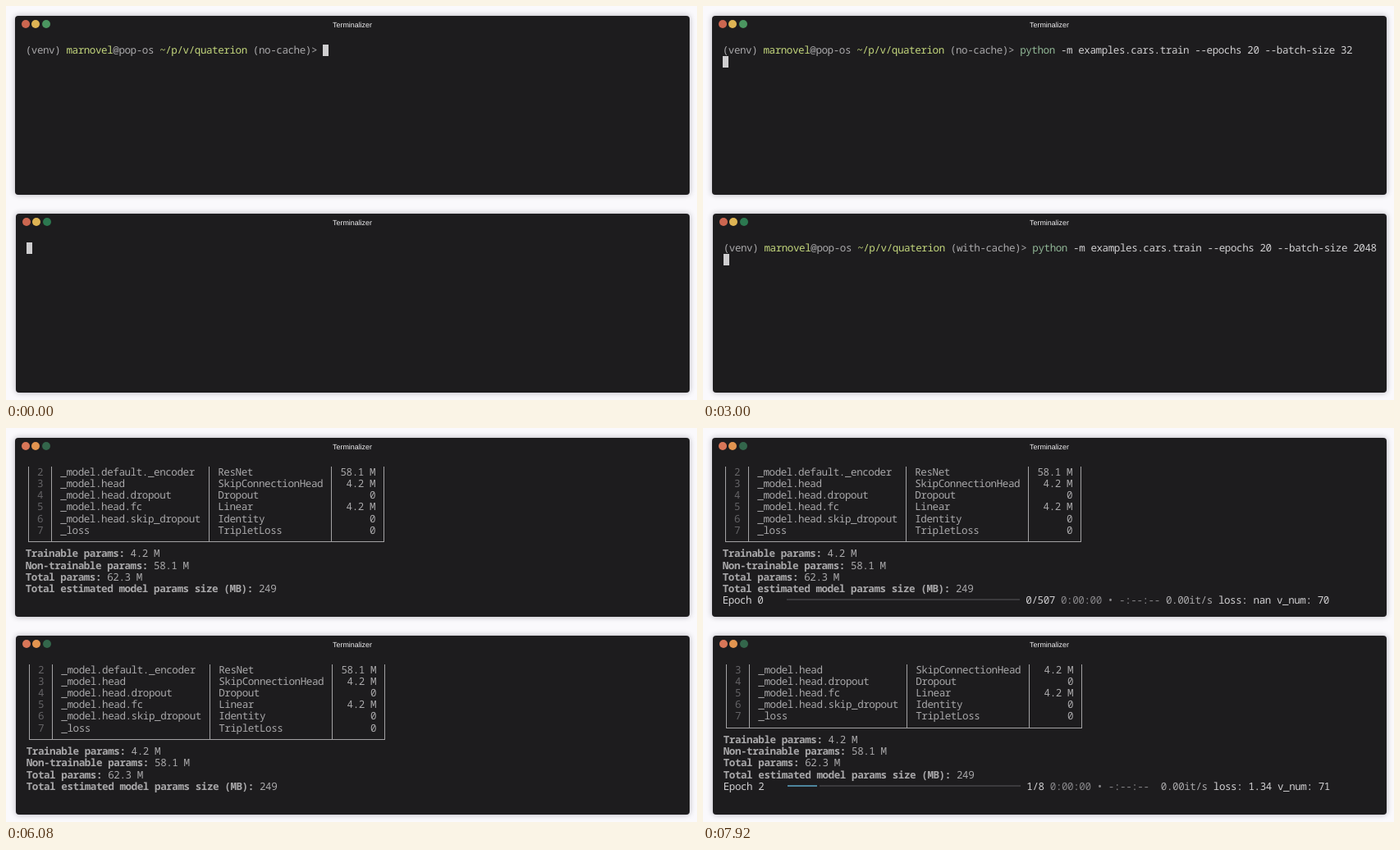
Recreate the animation shown at these times as an HTML page. Size 842 px wide and 480 px high, loop 8000 ms.

```html
<!DOCTYPE html>
<html lang="en">
<head>
<meta charset="utf-8">
<title>Training with and without cache</title>
<style>
  :root { --cw: 7.11px; --rh: 14.22px; }
  html, body { margin: 0; width: 842px; height: 480px; overflow: hidden; background: #faf9fc; }
  body { position: relative; }
  .win {
    position: absolute; height: 218px; border-radius: 4px;
    background: #1d1c1e; box-shadow: 0 0 7px rgba(20, 15, 35, .3);
  }
  #top { left: 11px; top: 12px; width: 822px; }
  #low { left: 12px; top: 252.8px; width: 821px; }
  .title {
    position: absolute; left: 0; right: 0; top: 5px; text-align: center;
    font: 8.9px/12px "Liberation Sans", Arial, sans-serif; color: #f0eff1;
    text-rendering: geometricPrecision;
  }
  #low .title { left: -1px; }
  .dot { position: absolute; top: 5.4px; width: 10px; height: 10px; border-radius: 50%; }
  .dot:nth-child(1) { left: 8px; background: #cb6650; }
  .dot:nth-child(2) { left: 20.3px; background: #deb454; }
  .dot:nth-child(3) { left: 32.6px; background: #4b9660; }
  #low .dot:nth-child(3) { background: #2c7850; }
  .late .dot:nth-child(1) { background: #d87658; }
  .late .dot:nth-child(2) { background: #e29450; }
  .late .dot:nth-child(3), #low.late .dot:nth-child(3) { background: #33664b; }
  .screen {
    position: absolute; left: 12.7px; top: 34.8px;
    font: 12.6px/var(--rh) "Noto Sans Mono", "DejaVu Sans Mono", monospace;
    letter-spacing: calc(var(--cw) - .6em);
    text-rendering: geometricPrecision; font-kerning: none; font-variant-ligatures: none;
    white-space: pre; color: #a9a8aa;
  }
  .row { height: var(--rh); }
  .user { color: #c3d67c; }
  .bad { color: #c9835a; }
  .ok { color: #91b796; }
  .lit { color: #d0cfd1; }
  .hint { color: #706f71; }
  .num { color: #646366; }
  .dim { color: #88878a; }
  .cur, .bar { display: inline-block; height: var(--rh); vertical-align: top; }
  .cur { width: var(--cw); background: #cfced0; color: #1d1c1e; }
  .bar {
    --end: calc(var(--n) * 2.5%);
    width: calc(40 * var(--cw));
    background: linear-gradient(90deg, #4d859d var(--end), transparent 0 calc(var(--end) + var(--gap)), #3b3a3d 0)
      0 5px / 100% 2px no-repeat;
  }
  .rule { position: absolute; background: #a3a2a4; }
</style>
</head>
<body>
<div class="win" id="top"><i class="dot"></i><i class="dot"></i><i class="dot"></i><div class="title">Terminalizer</div><div class="screen"></div></div>
<div class="win" id="low"><i class="dot"></i><i class="dot"></i><i class="dot"></i><div class="title">Terminalizer</div><div class="screen"></div></div>
<script>
const LOOP = 8000, CW = 7.11, RH = 14.22;
const NO_TIME = '-:--:--';

const layers = [
  ['_model.default._encoder', 'ResNet', '58.1 M'],
  ['_model.head', 'SkipConnectionHead', '4.2 M'],
  ['_model.head.dropout', 'Dropout', '0'],
  ['_model.head.fc', 'Linear', '4.2 M'],
  ['_model.head.skip_dropout', 'Identity', '0'],
  ['_loss', 'TripletLoss', '0']
];
const totals = [
  ['Trainable params:', '4.2 M'],
  ['Non-trainable params:', '58.1 M'],
  ['Total params:', '62.3 M'],
  ['Total estimated model params size (MB):', '249']
];

const span = (text, cls) => `<span class="${cls}">${text}</span>`;
const cursor = (ch = ' ') => span(ch, 'cur');
const rule = (x, y, w, h) =>
  `<i class="rule" style="left:${x}px;top:${y}px;width:${w}px;height:${h}px"></i>`;

const prompt = branch => '(venv) ' + span('marnovel', 'user') + '@pop-os ' +
  span('~/p/v/quaterion', 'user') + ` (${branch})&gt; `;

function shell(term, t) {
  if (t < term.ready) return [cursor()];
  const cmd = `python -m examples.cars.train --epochs 20 --batch-size ${term.batch}`;
  const head = prompt(term.branch);
  const full = head + span('python', 'ok') + span(cmd.slice(6), 'lit');
  if (t >= term.seed) return [full, 'Global seed set to 42', cursor()];
  if (t >= term.enter) return [full, cursor()];
  if (t >= term.accept) return [full + cursor()];
  const n = term.keys.filter(k => k <= t).length;
  if (!n) return [head + cursor()];
  return [head + span(cmd.slice(0, n), n < 6 ? 'bad' : 'ok') +
    cursor(cmd[n]) + span(cmd.slice(n + 1), 'hint')];
}

function summary(skip) {
  const rows = layers.slice(skip).map(([name, type, size], i) =>
    '  ' + span(i + skip + 2, 'num') + '   ' + name.padEnd(27) + type.padEnd(20) + size.padStart(7));
  const bottom = (rows.length + .5) * RH - 1;
  const mid = col => (col + .5) * CW - .5;
  rows[0] += [0, 4, 31, 52, 61].map(c => rule(mid(c), 0, 1, bottom)).join('') +
    rule(mid(0), bottom, 61 * CW + 1, 1);
  return [...rows, '', ...totals.map(([k, v]) => `<b>${k}</b> ${v}`)];
}

function progress(label, done, total, spent, left, speed, extra = '') {
  const cells = 40 * done / total;
  const bar = `<span class="bar" style="--n:${cells};--gap:${done ? CW / 2 : 0}px"></span>`;
  return span(label, 'lit') + bar + span(` ${done}/${total} `, 'lit') +
    span(`${spent} • ${left} `, 'dim') + speed + 'it/s' + span(extra, 'lit');
}

const sanity = (done, spent) => progress('Sanity Checking ', done, 2, spent, NO_TIME, '0.00');

function topRun(t) {
  const out = summary(0);
  if (t >= 7330)
    out.push(progress('Epoch 0    ', 0, 507, '0:00:00', NO_TIME, '0.00', ' loss: nan v_num: 70'));
  else if (t >= 6660) out.push(sanity(1, '0:00:01'));
  else if (t >= 6170) out.push(sanity(0, '0:00:00'));
  return out;
}

function lowRun(t) {
  const start = 6400, step = 85, length = 690;
  if (t < start) return [...summary(0), ...(t >= 6170 ? [sanity(t < 6290 ? 0 : 1, '0:00:00')] : [])];
  const epoch = Math.floor((t - start) / length);
  const done = Math.min(8, Math.floor((t - start) % length / step));
  const meter = (label, n, total, extra) => n < 2
    ? progress(label, n, total, '0:00:00', NO_TIME, ' 0.00', extra)
    : progress(label, n, total, '0:00:00', n < 6 && total > 4 ? '0:00:01' : '0:00:00', '11.48', extra);
  const loss = epoch || done ? (1.38 - .02 * epoch).toFixed(2) : 'nan';
  const validating = done >= 4;
  const out = summary(epoch || validating ? 1 : 0);
  out.push(meter(`Epoch ${epoch}    `, done, 8, ` loss: ${loss} v_num: 71`));
  if (validating) out.push(meter('Validation ', done - 4, 4));
  return out;
}

const terms = [
  { id: 'top', branch: 'no-cache', batch: 32, ready: 0, keys: [330, 500, 670, 840, 1010, 1200],
    accept: 1830, enter: 2170, seed: 3670, table: 5080, run: topRun },
  { id: 'low', branch: 'with-cache', batch: 2048, ready: 170, keys: [580, 800, 1000, 1200, 1420, 1750],
    accept: 2330, enter: 2330, seed: 3920, table: 5750, run: lowRun }
];
for (const term of terms) {
  term.win = document.getElementById(term.id);
  term.screen = term.win.querySelector('.screen');
}

function draw(now) {
  const t = now % LOOP;
  for (const term of terms) {
    const lines = t < term.table ? shell(term, t) : term.run(t);
    const html = lines.map(l => `<div class="row">${l}</div>`).join('');
    if (html !== term.html) term.screen.innerHTML = term.html = html;
    term.win.classList.toggle('late', t >= 5080);
  }
}

const began = performance.now();
function tick() {
  draw(performance.now() - began);
  requestAnimationFrame(tick);
}
tick();
</script>
</body>
</html>
```
